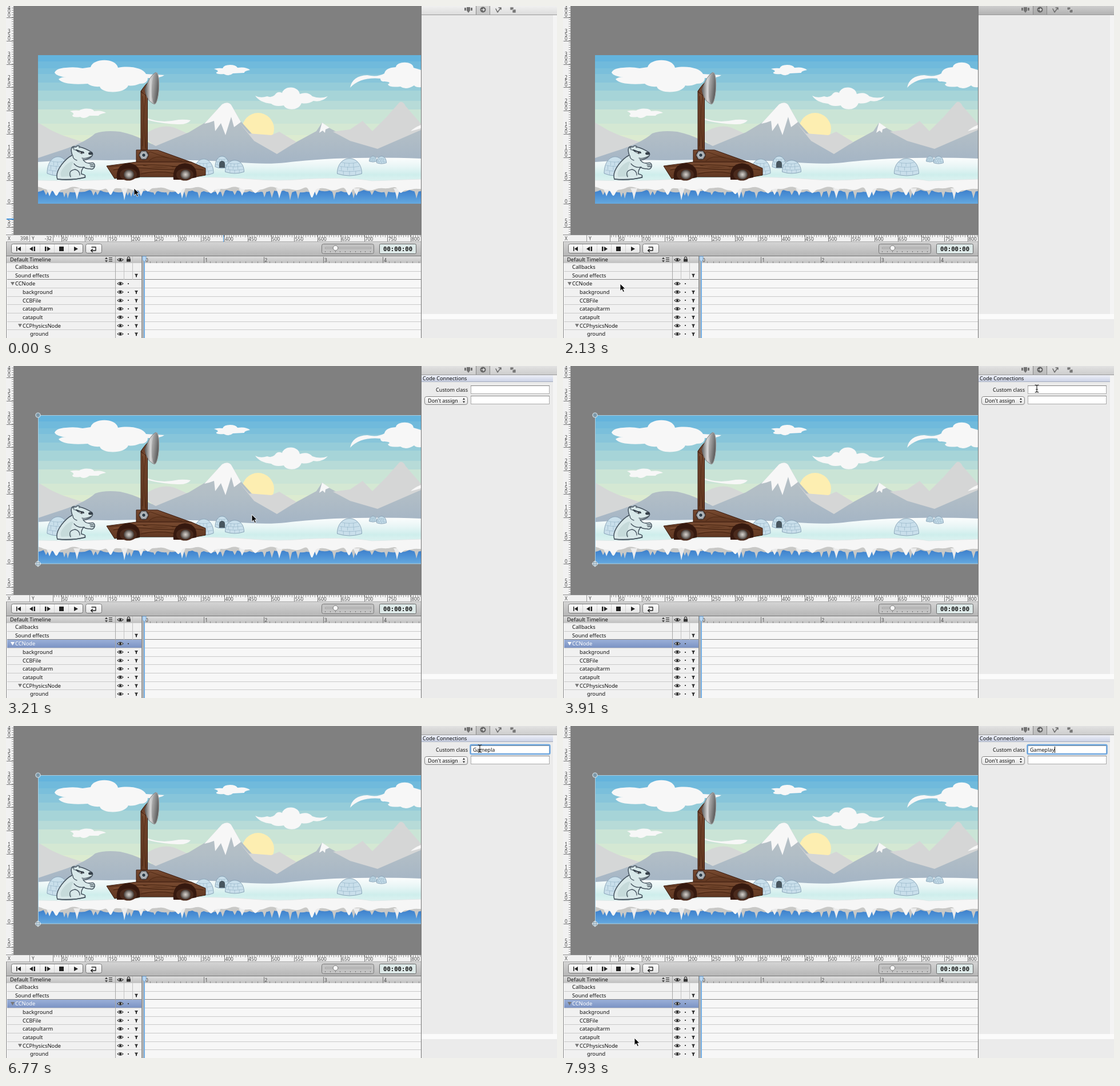
These frames come from a looping animation (964x581 px, 8 s). An HTML page:

```html
<!DOCTYPE html>
<html lang="en">
<head>
<meta charset="utf-8">
<title>Scene editor</title>
<style>
html, body { margin: 0; width: 100%; height: 100%; overflow: hidden; background: #ececec; }
svg { display: block; width: 964px; height: 581px; }
text { font: 9.3px "Noto Sans", "Open Sans", sans-serif; fill: #111; white-space: pre; }
.panel text { font-size: 9.1px; }
.ruler text { font-size: 8.4px; fill: #4a4a4a; }
</style>
</head>
<body>
<svg id="stage" viewBox="0 0 964 581" xmlns="http://www.w3.org/2000/svg"></svg>
<script>
const stage = document.getElementById('stage');
const rect = (x, y, w, h, fill, more = '') => `<rect x="${x}" y="${y}" width="${w}" height="${h}" fill="${fill}" ${more}/>`;
const path = (d, fill = 'none', more = '') => `<path d="${d}" fill="${fill}" ${more}/>`;
const line = (d, color, width = 1) => path(d, 'none', `stroke="${color}" stroke-width="${width}" stroke-linecap="round" stroke-linejoin="round"`);
const oval = (x, y, rx, ry, fill, more = '') => `<ellipse cx="${x}" cy="${y}" rx="${rx}" ry="${ry}" fill="${fill}" ${more}/>`;
const text = (x, y, s, more = '') => `<text x="${x}" y="${y}" ${more}>${s}</text>`;
const group = (s, more = '') => `<g ${more}>${s}</g>`;
const range = (n, fn) => Array.from({ length: n }, (_, i) => fn(i)).join('');
const grad = (id, colors, dir = 'x2="0" y2="1"') => `<linearGradient id="${id}" ${dir}>` +
  colors.map((c, i) => `<stop offset="${i / (colors.length - 1)}" stop-color="${c}"/>`).join('') + '</linearGradient>';

const defs = `<defs><clipPath id="view"><rect x="56" y="86" width="670" height="260"/></clipPath>` +
  grad('rock', ['#b9c2c6', '#b2bec6', '#a3b4c5']) + grad('snow', ['#fbfdfd', '#e9f6f6', '#cfeeec', '#e0f4f2']) +
  grad('sea', ['#3878c5', '#4b90d6', '#66a9de']) + grad('wood', ['#784a30', '#5f3620']) +
  grad('steel', ['#5a5a5a', '#d6d6d6', '#9a9a9a'], 'x2="1" y2="0"') +
  grad('dish', ['#b4b4b4', '#8a8a8a', '#5c5c5c'], 'x2="1" y2=".3"') +
  grad('bar', ['#d4d4d4', '#b5b5b5']) + grad('button', ['#fefefe', '#e2e2e2']) +
  grad('head', ['#dedede', '#bfbfbf']) + grad('pick', ['#9bb0d8', '#7b93c4']) +
  grad('title', ['#eef0f8', '#c9d0e4']) + grad('idle', ['#f0f0f0', '#dcdcdc']) + grad('pressed', ['#cecece', '#b2b2b2']) +
  grad('active', ['#e2e2e2', '#cdcdcd']) +
  `<radialGradient id="hub"><stop offset="0" stop-color="#d8d4cf"/><stop offset=".5" stop-color="#96908b"/><stop offset="1" stop-color="#443c38"/></radialGradient></defs>`;

// Scene
const skyStops = [[95, 177, 221], [146, 203, 217], [200, 227, 215], [224, 236, 207]];
const skyColor = k => {
  const i = Math.min(2, Math.floor(k * 3)), f = k * 3 - i;
  return `rgb(${skyStops[i].map((v, c) => Math.round(v + (skyStops[i + 1][c] - v) * f))})`;
};
const skyEdges = [86, 97, 109, 119, 134, 148, 166, 181, 206, 226, 242];
const sky = skyEdges.slice(1).map((y, i) => rect(56, skyEdges[i], 670, y - skyEdges[i], skyColor(((y + skyEdges[i]) / 2 - 86) / 156))).join('');

const clouds = path(`M85 117Q87 109 105 108Q120 106 134 109L148 107C152 91 192 90 196 108C218 104 240 109 245 119L277 121Q270 127 248 126Q248 136 234 136Q222 141 214 139C208 154 168 154 164 141Q150 142 143 136Q100 139 92 128Q98 123 106 125Q89 123 85 117Z
M364 110Q372 108 379 109Q381 103 392 103Q402 103 405 108Q420 106 427 112Q416 114 417 117L397 118Q390 124 381 119Q366 120 368 116Q375 114 364 110Z
M436 157Q445 162 457 158Q464 161 470 156Q475 148 483 152C487 139 511 139 514 154Q528 149 536 158Q550 163 563 158Q553 169 538 166Q528 172 517 170C512 184 490 183 486 174Q471 177 464 171Q444 169 436 157Z
M602 143Q606 122 632 121Q650 125 662 118Q664 108 682 107C684 96 712 96 713 108L726 112V142Q718 143 714 139Q700 148 690 141Q670 143 668 137Q676 133 662 132Q655 133 655 127Q620 124 602 143Z
M112 184Q120 182 128 183Q135 178 148 180Q153 181 154 184Q168 182 175 187Q163 189 162 192L146 192Q136 199 130 194Q116 196 116 191Q122 189 112 184Z
M247 196Q270 206 302 199Q314 198 323 200Q317 208 300 207Q270 206 247 199Z`, '#f7f7f7');

const mountains = path('M56 204L80 218L98 226L140 240L110 262L56 272ZM240 226Q272 204 295 213L333 230L262 248Z', '#d5d7d7') +
  path('M56 266L86 256Q138 240 156 223Q172 217 200 220Q222 225 236 232L262 245L320 221L350 203L378 172Q388 166 394 173L410 201L436 230L474 258L508 238L543 219L553 204L565 213L585 224L602 234L650 249L726 215V280H56Z', 'url(#rock)') +
  path('M408 204L425 223L464 226L478 220L508 238L474 259L434 236ZM572 220L602 216L624 201L641 219L666 194L688 169Q694 165 699 175L726 206V217L650 250L602 236Z', '#d5d6d6') +
  path('M347 206L378 172Q388 166 394 173L411 203L399 212L394 194L384 226L376 205L366 219L364 201Q357 204 347 206ZM548 222L553 204L566 213L559 216L558 222L554 218ZM726 208Q714 213 708 219Q720 216 726 214Z', '#f7f7f7');

function igloo(x, y, w, h) {
  const l = x - w / 2, b = y - h * .12;
  return group(path(`M${l} ${b}C${l} ${y - h * 1.3} ${l + w} ${y - h * 1.3} ${l + w} ${b}Q${x} ${y + h * .12} ${l} ${b}Z`, '#c9dfeb', 'stroke="#829eb2" stroke-width=".9"') +
    line([.3, .55, .78].map(k => `M${l + w * (.04 + k * k * .22)} ${y - h * k}q${w * (.46 - k * k * .22)} ${h * .12} ${w * (.92 - k * k * .44)} 0`).join('') +
      [.25, .5, .75].map((k, i) => `M${l + w * k} ${y - h * .05}v${-h * .22}M${l + w * (k - .08)} ${y - h * .32}v${-h * .2}M${l + w * (.3 + i * .18)} ${y - h * .55}v${-h * .18}`).join(''), '#9ab8ca', .7));
}
const plain = path('M56 273Q120 268 180 270Q300 267 400 273Q455 278 490 274Q590 262 726 267V310H56Z', 'url(#snow)');
const igloos = igloo(91, 297, 38, 33) + igloo(346, 296, 34, 28) + igloo(378, 284, 24, 21) +
  path('M373 283v-7a5 5 0 0 1 10 0v7Z', '#48565f') + igloo(400, 293, 33, 23) +
  igloo(601, 297, 43, 30) + igloo(642, 273, 13, 10) + igloo(657, 276, 17, 13);

const spikes = [70, 76, 102, 108, 124, 153, 160, 207, 213, 219, 236, 260, 283, 308, 315, 338, 370, 379, 400, 413, 452, 465, 478, 497, 511, 543, 574, 608, 613, 640, 665, 684, 718];
const drips = [[88, 12], [183, 14], [248, 7], [302, 9], [359, 6], [436, 7], [535, 18], [600, 13], [690, 8]];
const lip = x => 319.5 + 2 * Math.sin(x / 11) + 1.2 * Math.sin(x / 5) + drips.reduce((s, [d, h]) => s + h * Math.exp(-(((x - d) / 5) ** 2)), 0);
let edge = '';
for (let x = 726; x >= 56; x -= 2) edge += `L${x} ${lip(x).toFixed(1)}`;
const crest = 'M56 305Q130 307 200 303Q350 296 430 303Q480 307 520 303Q600 299 640 306L726 303';
const icicles = white => spikes.filter((x, i) => (i % 3 === 1) === white)
  .map(x => `M${x - 6} 319Q${x - 2} 326 ${x} ${331 + x * 7 % 10}Q${x + 3} 326 ${x + 6} 319Z`).join('');
const ground = rect(56, 317, 670, 29, 'url(#sea)') + path('M56 314H726V324' +
  range(34, i => `Q${716 - i * 20} ${326 + i * 5 % 4} ${706 - i * 20} ${322 + i * 3 % 4}`) + 'H56Z', '#c8c8c6') +
  path(icicles(false), '#c8c8c6') + path(icicles(true), '#ececec') +
  path(crest + edge + 'Z', '#f6f6f6') + line(crest, '#dde6e6', .8);

const ink = '#45525e';
const bear = path('M90 303Q86 293 97 278Q106 266 116 261Q113 252 115 248Q118 244 122 247Q126 242 130 247Q139 249 150 256Q154 260 148 265Q140 270 135 269Q139 276 148 275Q156 273 155 281Q153 287 147 285Q139 285 136 282Q131 288 132 294Q142 296 137 300Q120 305 90 303Z', '#d8e8e9', `stroke="${ink}" stroke-width="1.5"`) +
  path('M97 299Q92 292 104 279Q114 270 118 273Q110 286 116 298Z', '#c6dada') +
  line('M117 262Q117 268 124 270M119 276Q125 284 137 282M113 299Q108 288 121 286Q129 288 129 296M90 303Q112 306 139 300M133 266Q140 268 149 263', ink, 1.3) +
  line('M118 251l10 3M147 278h6M148 281h6', ink, 1.3) +
  path('M124 254l12 1l-3 4Z', '#fff', `stroke="${ink}"`) + line('M123 252L136 257', '#303a44', 2) +
  oval(148, 258, 4, 2.6, '#36404a') + oval(118, 248, 2, 1.7, '#66747e') + oval(129, 247, 2, 1.6, '#66747e') + oval(132, 257, 1, 1, '#222');

const bark = 'stroke="#38190d"';
const wheel = x => path(`M${x - 20} 304Q${x - 23} 277 ${x} 275Q${x + 23} 277 ${x + 20} 300L${x} 304Z`, '#36190f') +
  oval(x, 295, 15, 10.5, '#4a2a1c') + oval(x + 1, 295, 9, 8.5, 'url(#hub)');
const catapult = path('M236 253V149L245 138H247.5V253Z', 'url(#wood)', bark) +
  path('M236 150Q238 145 246 136L252 130L250 150L247 158Z', '#6c422c', bark) +
  line('M239 158Q242 190 239 245M244 155Q240 200 244 248', '#42210f', .9) + line('M241.5 152V250', '#8a5a3b', .7) +
  path('M262 116Q251 122 243 146Q244 157 250 165Q256 171 260 172Z', 'url(#steel)', 'stroke="#666" stroke-width=".7"') +
  oval(261.5, 144, 6, 27.5, 'url(#dish)', 'stroke="#a2a2a2" transform="rotate(3 261 144)"') +
  path('M228 252H265L326 274H228Z', 'url(#wood)', bark) + line('M234 269L252 255Q285 268 308 271M250 271Q260 260 284 266', '#492511', .8) +
  path('M176 280L228 273H324L349 284V296L332 299H202L190 302Z', 'url(#wood)', bark) +
  line('M181 281Q238 276 276 279T345 287M188 287Q212 281 245 284T294 286M236 294Q263 287 295 293M240 279Q270 285 325 278', '#42210f', .9) +
  line('M188 284Q260 278 290 282M238 290Q270 287 290 289', '#8a5a3b', .7) +
  wheel(214) + wheel(313) +
  oval(241, 261, 9, 9, '#4b2b1e') + path('M233 261l4-7h8l4 7l-4 7h-8Z', '#a6abb0', 'stroke="#4b4f52"') + oval(241, 261, 3.5, 3.5, '#30404d', 'stroke="#e6eaec"');

const scene = rect(14, 0, 712, 400, '#808080') + group(sky + clouds + oval(441, 215, 28, 28, '#fdeeb1') + mountains + plain + igloos + ground + bear + catapult, 'clip-path="url(#view)"');
const handle = y => oval(56, y, 4, 4, '#7d98a9', 'stroke="#d5e3ea" stroke-width="1.2"');
const outline = group(line('M726 86.5H56.5V346H726', '#a9cfe2') + handle(86) + handle(346) + line('M51 346h10M56 341v10', '#eef4f8', 1.2), 'id="outline"');

// Rulers: 50 units span 40.75 px
const unit = 40.75;
const rulers = group(rect(0, 0, 14, 400, '#f1f1f1') + rect(13, 0, 1, 400, '#8b8b8b') +
  range(99, i => rect(10, Math.round(398 - i * unit / 10), 3, 1, '#999')) +
  range(10, i => {
    const n = i - 1, y = 346 - n * unit;
    return rect(1, Math.round(y), 12, 1, '#777') + [...String(Math.abs(n * 50))].reverse().map((c, k) => text(3, (y - 1 - k * 6.6).toFixed(1), c)).join('');
  }) + rect(0, 400, 726, 13, '#f1f1f1') + rect(0, 400, 726, 1, '#8b8b8b') + rect(0, 412, 726, 1, '#aaa') +
  range(158, i => rect(Math.round(84 + i * unit / 10), 401, 1, i % 2 ? 3 : 4, '#999')) +
  range(16, i => rect(Math.round(56 + (i + 1) * unit), 401, 1, 11, '#777') + text((57.5 + (i + 1) * unit).toFixed(1), 410.5, (i + 1) * 50)) +
  rect(41, 401, 1, 11, '#999') + rect(82, 401, 1, 11, '#888') + text(3, 409.5, 'X') + text(45, 409.5, 'Y') +
  text(39, 409.5, '', 'id="posX" text-anchor="end"') + text(80, 409.5, '', 'id="posY" text-anchor="end"') +
  rect(0, 401, 1, 12, '#3d8fd8', 'id="markX"') + rect(1, 0, 13, 2, '#3d8fd8', 'id="markY"'), 'class="ruler"');

// Playback bar
const pill = (x, w) => rect(x + .5, 416.5, w, 16, 'url(#button)', 'rx="3" stroke="#737373"');
const playback = rect(0, 413, 726, 25, 'url(#bar)') + rect(0, 437, 726, 1, '#777') + pill(9, 125) + pill(139, 28) +
  range(4, i => rect(34 + i * 25, 417, 1, 15, '#d0d0d0')) +
  path('M18 421h1.5v8h-1.5ZM26 421v8l-6-4ZM47 421v8l-6-4ZM48.5 421h2.5v8h-2.5ZM68 421h2.5v8h-2.5ZM72 421v8l6-4ZM93 421h8v8h-8ZM119 421v8l7-4Z', '#222') +
  line('M150 422H157V428H149M151.5 425.5L148.5 428L151.5 430.5', '#222', 1.4) +
  rect(552.5, 416.5, 91, 17, '#c2c2c2', 'rx="3" stroke="#777"') + rect(558, 422, 81, 3, '#999', 'rx="1.5"') + rect(559, 423, 79, 1, '#dedede') +
  range(10, i => rect(558 + Math.round(i * 8.8), 429, 1, 2, '#777')) + oval(576.5, 423.5, 4.3, 4.3, '#f7f7f7', 'stroke="#777"') +
  rect(653.5, 416.5, 64, 17, '#dce8e7', 'rx="2" stroke="#666"') +
  text(660, 429, '00:00:00', 'style="font:bold 10.6px \'DejaVu Sans Mono\',monospace"');

// Timeline
const pitch = 14.67, rowTop = i => Math.floor(449.6 + i * pitch);
const eye = y => path(`M195 ${y}q5-5 10 0q-5 5-10 0Z`, '#f4f4f4', 'stroke="#333" stroke-width="1.1"') + oval(200, y, 2, 2, '#222');
const rows = [['Callbacks', 16], ['Sound effects', 16], ['CCNode', 16], ['background', 29], ['CCBFile', 29], ['catapultarm', 29], ['catapult', 29], ['CCPhysicsNode', 29], ['ground', 42]];
const twist = (x, y, more = '') => path(`M${x} ${y - 3}h7l-3.5 6Z`, '#777', more);
const timeline = rect(0, 438, 726, 143, '#f7f7f7') + rect(0, 450, 238, 131, '#f1f1f1') +
  rect(0, 438, 726, 12, 'url(#head)') + text(7, 447.4, 'Default Timeline') +
  path('M173 443l2.5-3.5l2.5 3.5ZM173 445l2.5 3.5l2.5-3.5ZM180 440h6v1.2h-6ZM180 443h6v1.2h-6ZM180 446h6v1.2h-6Z', '#444') +
  rows.map((r, i) => rect(2, rowTop(i), 724, 1, i === 2 ? '#858585' : '#c9c9c9')).join('') +
  rect(2, 479, 236, 14, 'url(#pick)', 'id="picked"') +
  rows.map(([name, x], i) => {
    const y = 456.6 + i * pitch;
    return text(x, (y + 3.4).toFixed(1), name, i === 2 ? 'id="nodeName"' : '') +
      (i > 1 ? eye(y) + rect(213, Math.round(y) - 1, 2, 2, '#444') : '') +
      (i === 1 || i > 2 ? path(`M225 ${y - 2.5}h6l-2 3.2v2.5h-2v-2.5Z`, '#333') : '');
  }).join('') + twist(8, 486, 'id="nodeTwist"') + twist(21, 559.3) +
  eye(444) + rect(211, 442.5, 7, 5, '#333') + line('M212.5 442v-1a2 2 0 0 1 4 0v1', '#333', 1.2) +
  rect(191, 438, 1, 143, '#a5a5a5') + rect(206, 438, 1, 41, '#c2c2c2') + rect(221, 438, 1, 41, '#c2c2c2') +
  rect(0, 413, 1, 168, '#8c8c8c') + rect(237, 438, 5, 143, '#b2b2b2') + rect(237, 438, 1, 143, '#888') +
  range(47, i => rect(Math.round(242 + i * 10.43), 447, 1, 3, '#888')) +
  group(range(5, i => rect(Math.round(242 + i * 104.3), 439, 1, 11, '#777') + text(244 + i * 104.3, 447.5, i)), 'class="ruler"') +
  rect(241, 438, 2, 143, '#75afe5') + path('M239 438h6v6l-3 4l-3-4Z', '#b9d7f2', 'stroke="#6aa2d8" stroke-width=".8"');

// Inspector
const field = y => rect(813.5, y + .5, 137, 14, '#fff', 'stroke="#aaa"') + rect(813, y, 138, 1, '#858585');
const inspector = rect(726, 0, 238, 581, '#ebebeb') + rect(957, 16, 7, 524, '#f4f4f4') + rect(727, 539, 237, 9, '#fbfbfb') +
  rect(727, 0, 237, 15, 'url(#idle)', 'id="tabs"') + rect(822, 0, 25, 15, '#858585', 'opacity=".25"') +
  rect(822, 0, 1, 15, '#888') + rect(846, 0, 1, 15, '#888') + rect(727, 15, 237, 1, '#9a9a9a') +
  path('M802 3h3v5h-3ZM813 3h3v5h-3ZM806 2h6v6l-3 4l-3-4Z', '#727272') + oval(834.5, 6.5, 5, 5, '#666') + line('M832 6.5h5M835 4.5l2 2l-2 2', '#eee', 1.1) +
  line('M857 5l3 6l5-7M862 3h4v3', '#707070', 1.6) + path('M882 2h6v5h-6ZM886 6h6v6h-6Z', '#777', 'stroke="#ddd" stroke-width=".7"') +
  group(rect(727, 16, 230, 12, 'url(#title)') + rect(727, 27, 230, 1, '#a5adbd') + text(729, 25.4, 'Code Connections') +
    text(808, 45, 'Custom class', 'text-anchor="end"') + field(34) + field(52) +
    rect(812.5, 33, 139, 16, 'none', 'id="focus" rx="2" stroke="#6da6df" stroke-width="2.4"') +
    rect(732.5, 53.5, 75, 14, 'url(#button)', 'rx="3.5" stroke="#858585"') + text(738, 63.6, "Don't assign") +
    path('M799 59l2-3.3l2 3.3ZM799 61.5l2 3.3l2-3.3Z', '#333') +
    text(817, 44.8, '', 'id="typed"') + rect(817, 36, 1, 11, '#000', 'id="caret"'), 'id="form" class="panel"') +
  rect(726, 0, 1, 581, '#777');

const pointers = group(path('M0 0V12.5L3 9.8L5.2 14.6L7.4 13.6L5.2 9H9.2Z', '#000', 'stroke="#fff" stroke-width=".9"'), 'id="arrow"') +
  group(line('M-3-6Q0-6 0-4Q0-6 3-6M0-4V5M-3 7Q0 7 0 5Q0 7 3 7M-1.5 2h3', '#222', 1.1), 'id="beam"');

stage.innerHTML = defs + scene + outline + rulers + playback + timeline + inspector + pointers;

// [ms, x, y, text pointer]
const moves = [[0, 224, 319], [540, 212, 326], [710, 200, 338], [800, 183, 362], [880, 160, 395], [970, 135, 428], [1060, 115, 458], [1150, 104, 476], [1240, 100, 486],
  [3030, 110, 487], [3210, 430, 260], [3290, 787, 7], [3440, 797, 14], [3530, 808, 22], [3610, 817, 29], [3700, 823, 34], [3790, 827, 38, 1], [3910, 829, 39, 1],
  [7120, 826, 60, 1], [7200, 650, 215], [7290, 429, 349], [7410, 215, 465], [7500, 150, 537], [7640, 136, 541], [7750, 128, 544], [7840, 123, 546], [7930, 125, 546]];
const keys = [[0, 0], [4970, 1], [5150, 2], [5510, 3], [5600, 4], [5960, 5], [6140, 6], [6230, 7], [6850, 8]];
const blinks = [[0, 0], [4110, 1], [4740, 0], [4970, 1], [6770, 0], [6850, 1], [7410, 0], [7930, 1]];
const tabLooks = [[0, 'idle'], [2130, 'pressed'], [2850, 'active']];
// [ms, X, Y, mark x, mark y]
const readouts = [[0, 398, -32, 380, 372], [970], [7290, 491, 2, 455, 345], [7410]];

const el = Object.fromEntries([...stage.querySelectorAll('[id]')].map(e => [e.id, e]));
const at = (steps, t) => steps.findLast(s => s[0] <= t);
const set = (e, name, v) => e.setAttribute(name, v);
const show = (e, on) => set(e, 'display', on ? 'inline' : 'none');

function draw(t) {
  const [, x, y, beam] = at(moves, t);
  for (const p of [el.arrow, el.beam]) set(p, 'transform', `translate(${x} ${y})`);
  show(el.arrow, !beam);
  show(el.beam, beam);

  const [, px = '', py = '', mx = 0, my = 0] = at(readouts, t);
  el.posX.textContent = px;
  el.posY.textContent = py;
  show(el.markX, mx);
  show(el.markY, my);
  set(el.markX, 'x', mx);
  set(el.markY, 'y', my);

  const selected = t >= 2850, focused = t >= 4110;
  for (const e of [el.outline, el.picked, el.form]) show(e, selected);
  el.nodeName.style.fill = selected ? '#fff' : '#111';
  set(el.nodeTwist, 'fill', selected && !focused ? '#fff' : '#777');
  set(el.tabs, 'fill', `url(#${at(tabLooks, t)[1]})`);

  show(el.focus, focused);
  el.typed.textContent = 'Gameplay'.slice(0, at(keys, t)[1]);
  show(el.caret, at(blinks, t)[1]);
  set(el.caret, 'x', Math.round(817 + (selected ? el.typed.getComputedTextLength() : 0)));
}

const start = performance.now();
function tick() {
  draw((performance.now() - start) % 8000);
  requestAnimationFrame(tick);
}
tick();
</script>
</body>
</html>
```
